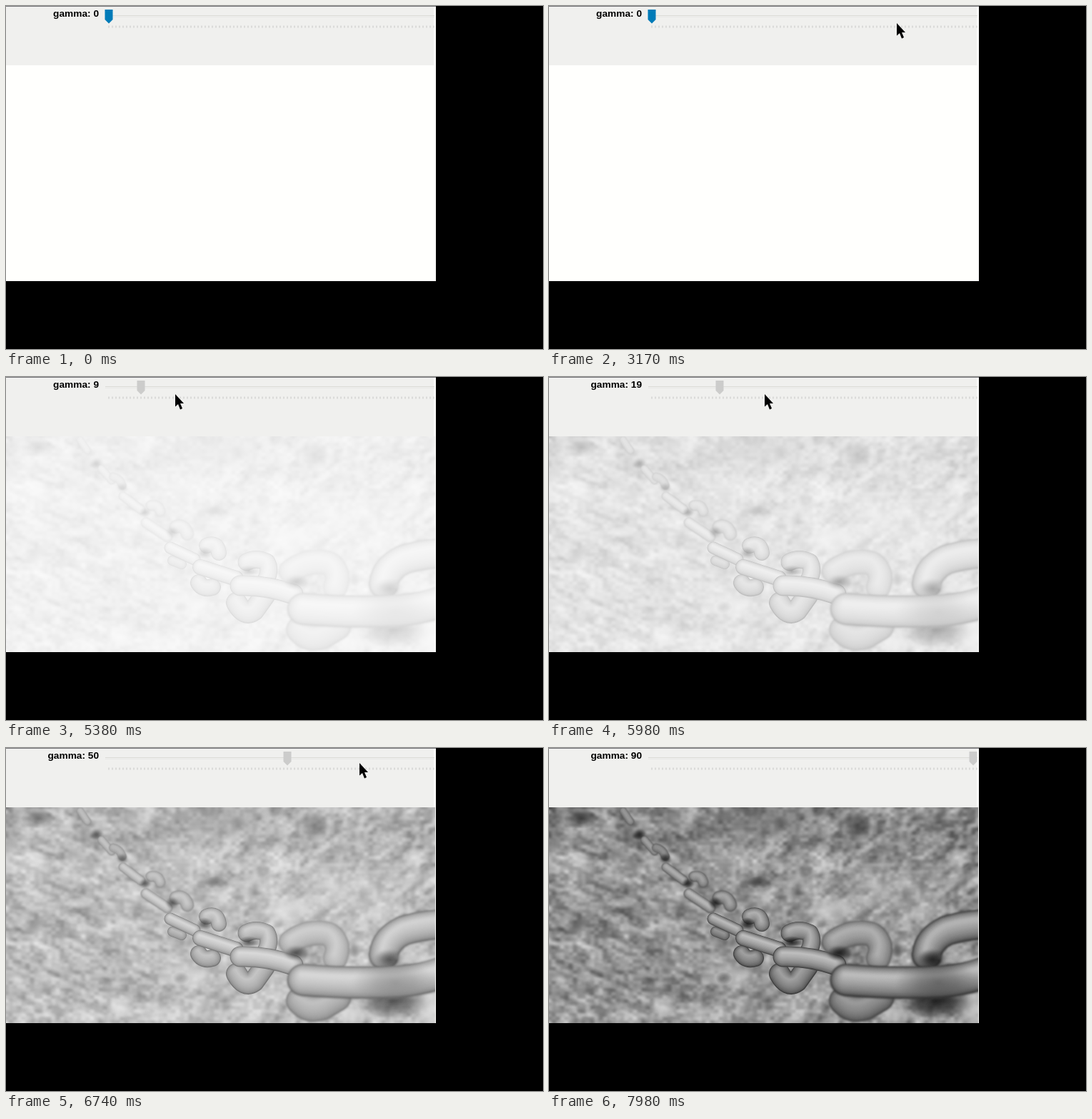
These frames come from a looping animation (752x480 px, 8000 ms). An HTML page with a canvas:

```html
<!DOCTYPE html>
<html lang="en">
<head>
<meta charset="utf-8">
<title>Gamma slider</title>
<style>
  html, body { margin: 0; width: 100%; height: 100%; overflow: hidden; background: #000; }
  #window { position: absolute; left: 0; top: 0; width: 602px; height: 385px; overflow: hidden; background: #fffffd; }
  #photo { position: absolute; left: 0; top: 83px; filter: url(#gamma); }
  svg { position: absolute; left: 0; top: 0; }
  text { font: bold 13.7px "Liberation Sans", Arial, sans-serif; text-anchor: end; }
</style>
</head>
<body>
<div id="window">
  <canvas id="photo" width="601" height="302"></canvas>
  <svg width="602" height="385">
    <filter id="gamma" x="0" y="0" width="1" height="1" color-interpolation-filters="sRGB">
      <feComponentTransfer>
        <feFuncR type="gamma" exponent="0"/>
        <feFuncG type="gamma" exponent="0"/>
        <feFuncB type="gamma" exponent="0"/>
      </feComponentTransfer>
    </filter>
    <rect width="599" height="83" fill="#f0f0ee"/>
    <path d="M0 .5H602" stroke="#77777a"/>
    <path d="M139 13.5H600" stroke="#dadad6"/>
    <path d="M139 15.5H600" stroke="#e8e8e6"/>
    <path d="M143.5 29H600" stroke="#c4c4c2" stroke-width="3" stroke-dasharray="1 4"/>
    <text id="label" x="130" y="15"></text>
    <path id="thumb" d="M-5.5 5H5.5V19L0 24.5L-5.5 19Z"/>
    <path id="cross" d="M-9.5 0H9.5M0-9.5V9.5" stroke="#000" stroke-width="3"/>
    <path id="arrow" d="M0 0V17.5L4 14L7 21.5L10 20L7 13H12Z"/>
  </svg>
</div>
<script>
const $ = id => document.getElementById(id);
const W = 601, H = 302, TOP = 83;
const pen = $('photo').getContext('2d');

const hash = (x, y) => {
  const s = Math.sin(x * 127.1 + y * 311.7) * 43758.5453;
  return s - Math.floor(s);
};
const mix = (a, b, k) => a + (b - a) * k;
const smooth = k => k * k * (3 - 2 * k);
const gray = (tone, alpha = 1) => `rgba(${tone},${tone},${tone},${alpha})`;

function noise(x, y) {
  const i = Math.floor(x), j = Math.floor(y), u = smooth(x - i), v = smooth(y - j);
  return mix(mix(hash(i, j), hash(i + 1, j), u), mix(hash(i, j + 1), hash(i + 1, j + 1), u), v);
}

// Blurred grass, with blades leaning right on one side and left on the other
function drawGrass() {
  const img = pen.createImageData(W, H);
  for (let y = 0; y < H; y++) for (let x = 0; x < W; x++) {
    const lean = smooth(Math.min(1, Math.max(0, (x - 180) / 160)));
    const a = noise((x * .9 + y * .4) / 14, (y * .9 - x * .4) / 7);
    const b = noise((x * .8 - y * .6) / 13 + 90, (y * .8 + x * .6) / 8);
    const broad = noise(x / 38 + 7, y / 24 + 3);
    const fine = noise(x / 6, y / 5);
    const v = .56 + (mix(a, b, lean) - .5) * .26 + (broad - .5) * .18 + (fine - .5) * .16
      - .07 * Math.max(0, 1 - y / 90);
    img.data.set([v * 255, v * 255, v * 255, 255], (y * W + x) * 4);
  }
  pen.putImageData(img, 0, 0);
}

function glow(x, y, rx, ry, tone, alpha) {
  pen.save();
  pen.translate(x, y);
  pen.scale(rx, ry);
  const g = pen.createRadialGradient(0, 0, 0, 0, 0, 1);
  g.addColorStop(0, gray(tone, alpha));
  g.addColorStop(.45, gray(tone, alpha * .7));
  g.addColorStop(1, gray(tone, 0));
  pen.fillStyle = g;
  pen.fillRect(-1, -1, 2, 2);
  pen.restore();
}

// A round iron bar along a path, lit from above
function bar(path, width, dark, light) {
  const shape = new Path2D(path), steps = 12;
  pen.lineCap = pen.lineJoin = 'round';
  for (let k = 0; k < steps; k++) {
    const f = k / steps;
    pen.save();
    pen.translate(-width * .05 * f, -width * .2 * f);
    pen.lineWidth = width * (1 - f);
    pen.strokeStyle = gray(mix(dark, light, Math.sqrt(f)));
    pen.stroke(shape);
    pen.restore();
  }
}

function drawPhoto() {
  drawGrass();
  pen.translate(0, -TOP);

  glow(395, 225, 42, 22, 215, .7);
  glow(470, 200, 110, 40, 185, .4);
  glow(105, 217, 22, 9, 205, .6);
  glow(160, 362, 20, 18, 220, .6);
  glow(255, 318, 45, 24, 195, .6);
  glow(572, 153, 18, 16, 220, .6);
  glow(600, 365, 42, 34, 200, .8);
  glow(485, 372, 28, 14, 195, .7);
  glow(45, 99, 24, 14, 35, .8);
  glow(300, 102, 110, 28, 65, .45);
  glow(432, 108, 22, 24, 40, .7);
  glow(295, 188, 18, 9, 45, .7);
  glow(245, 322, 12, 9, 60, .6);

  // Far links, out of focus
  pen.filter = 'blur(1.2px)';
  bar('M104 88L114 103', 9, 85, 150);
  glow(127, 121, 10, 9, 20, .9);
  bar('M134 129L148 145', 10, 75, 160);
  bar('M150 140Q160 142 163 152', 11, 80, 140);
  glow(163, 155, 9, 8, 20, .8);
  bar('M164 167L189 186', 12, 70, 175);
  bar('M203 180Q213 178 216 188', 14, 80, 160);
  glow(195, 190, 9, 8, 20, .9);
  bar('M196 204L226 224', 14, 70, 185);
  bar('M238 210Q250 206 254 220', 18, 75, 165);
  glow(233, 217, 10, 9, 20, .9);

  // Middle links, sharp
  pen.filter = 'blur(.6px)';
  bar('M233 257L246 262', 14, 65, 145);
  bar('M230 239L264 255', 17, 65, 185);
  bar('M281 236Q296 230 298 246', 22, 70, 172);
  glow(278, 246, 11, 9, 20, .9);
  bar('M270 288Q276 298 289 294', 24, 55, 155);
  bar('M272 266L322 282', 22, 60, 188);
  bar('M337 259Q350 252 365 259Q371 270 364 284', 25, 65, 172);
  glow(340, 272, 15, 9, 15, .9);
  bar('M323 316Q334 336 347 327L362 306', 30, 55, 155);
  bar('M328 292Q365 291 402 304', 29, 60, 188);

  // Near links, out of focus
  pen.filter = 'blur(1.8px)';
  bar('M399 272Q424 254 452 261Q470 273 461 295', 34, 85, 172);
  glow(407, 287, 18, 11, 15, .9);
  glow(488, 284, 9, 12, 60, .7);
  bar('M411 354Q424 369 443 362L464 350', 38, 60, 150);
  bar('M529 290Q531 268 557 256Q585 247 625 246', 42, 45, 180);
  glow(537, 296, 22, 15, 15, .9);
  glow(542, 354, 55, 24, 15, .95);
  bar('M416 325Q490 331 552 327Q590 324 622 310', 45, 45, 188);
  glow(545, 328, 60, 30, 40, .55);
  glow(575, 293, 32, 9, 165, .7);
  pen.filter = 'none';
}

function track(keys, t) {
  if (t <= keys[0][0]) return keys[0].slice(1);
  for (let i = 1; i < keys.length; i++) {
    const a = keys[i - 1], b = keys[i];
    if (t <= b[0]) return a.slice(1).map((v, n) => mix(v, b[n + 1], (t - a[0]) / (b[0] - a[0])));
  }
  return keys.at(-1).slice(1);
}

const DRAG = 4880;
const gammaKeys = [[DRAG, 0], [5980, 19], [6740, 50], [7080, 71], [7500, 84], [7980, 90]];
const approach = [[2080, 640, 122], [2460, 560, 26], [3340, 470, 24], [3900, 350, 150], [4370, 281, 138], [DRAG, 181, 24]];
const dragHeight = [[DRAG, 24], [5980, 24], [6740, 21]];
const channels = document.querySelectorAll('feComponentTransfer > *');

function place(node, x, y, visible = true) {
  node.setAttribute('transform', `translate(${Math.round(x)} ${Math.round(y)})`);
  node.style.display = visible ? '' : 'none';
}

function draw(t) {
  const dragging = t >= DRAG;
  const value = track(gammaKeys, t)[0], gamma = Math.round(value);
  const [x, y] = dragging ? [182.5 + 6.25 * value, track(dragHeight, t)[0]] : track(approach, t);

  $('label').textContent = `gamma: ${gamma}`;
  $('thumb').setAttribute('fill', dragging ? '#cccccb' : '#007bb8');
  place($('thumb'), 144 + 5 * gamma, 0);
  place($('cross'), x, y, y > TOP);
  place($('arrow'), x, y, y <= TOP);

  $('photo').style.visibility = gamma ? 'visible' : 'hidden';
  for (const channel of channels) channel.setAttribute('exponent', gamma / 100);
}

drawPhoto();
const start = performance.now();
function tick() {
  draw((performance.now() - start) % 8000);
  requestAnimationFrame(tick);
}
tick();
</script>
</body>
</html>
```
